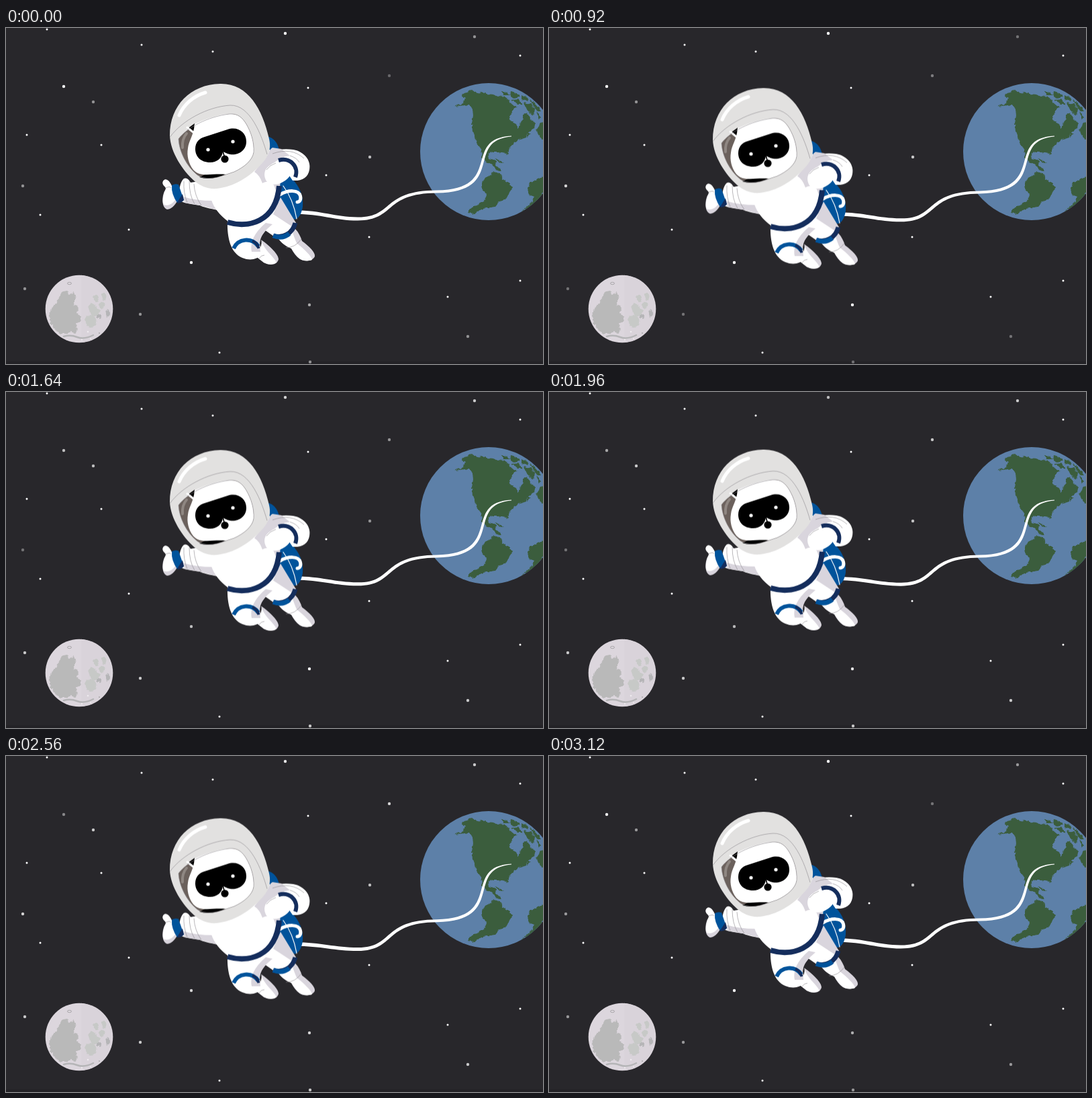
Write an HTML page that moves like this. It is 800 by 500 pixels and loops after 3.16 s.

```html
<!DOCTYPE html>
<html lang="en">
<head>
<meta charset="utf-8">
<title>Tethered astronaut</title>
<style>
html, body { margin: 0; width: 100%; height: 100%; overflow: hidden; background: #28272b; }
svg { display: block; width: 100vw; height: 100vh; }
.white { fill: #fff; }
.lilac { fill: #d9d5dd; }
.blue { fill: #00539b; }
.line { fill: none; stroke-linecap: round; stroke-linejoin: round; }
.thin { fill: none; stroke: #8b898e; stroke-width: .6; }
.navyband { fill: none; stroke: #142d5c; }
.blueband { fill: none; stroke: #00539b; }

#astronaut { animation: bob 3160ms ease-in-out infinite; }
@keyframes bob {
  0%, 100% { transform: translateY(0); }
  21.5% { transform: translateY(7.5px); }
  45.9% { transform: translateY(2px); }
  57.6% { transform: translateY(4.5px); }
  67.1% { transform: translateY(.4px); }
  83.5% { transform: translateY(10px); }
}

#tether { animation: sway 3160ms ease-in-out infinite; }
@keyframes sway {
  0%, 100% { d: path("M430 271.3C470 271.3 490 281.5 524 281.5C578.5 282 558.5 242 642 241.5C743 240 678 164.5 753 160.5L753 161.5C682 167.5 747 244 642 245.5C561.5 246 581.5 286 524 286.5C490 286.5 470 276.7 430 276.7Z"); }
  13.9%, 51.9% { d: path("M430 274.3C470 274.3 490 283.3 524 283.3C578.5 283.8 558.5 243 642 242.4C743 240.4 678 164.5 753 160.5L753 161.5C682 167.5 747 244.4 642 246.4C561.5 247 581.5 287.8 524 288.3C490 288.3 470 279.7 430 279.7Z"); }
  83%  { d: path("M430 277.3C470 277.3 490 285.1 524 285.1C578.5 285.6 558.5 244 642 243.3C743 241 678 164.5 753 160.5L753 161.5C682 167.5 747 245 642 247.3C561.5 248 581.5 289.6 524 290.1C490 290.1 470 282.7 430 282.7Z"); }
}

.twinkle { animation: twinkle 3160ms linear infinite; }
@keyframes twinkle {
  0%, 100% { opacity: var(--a); }
  13.9% { opacity: var(--b); }
  18.4%, 35.8% { opacity: var(--c); }
  51.9% { opacity: var(--d); }
  70.9% { opacity: var(--e); }
  81%, 88.6% { opacity: var(--f); }
}
</style>
</head>
<body>
<svg viewBox="0 0 800 500">
  <defs>
    <clipPath id="globe"><circle cx="719" cy="184" r="102"/></clipPath>
    <filter id="rough" x="-5%" y="-5%" width="110%" height="110%">
      <feTurbulence type="fractalNoise" baseFrequency=".18" numOctaves="2" seed="4"/>
      <feDisplacementMap in="SourceGraphic" scale="5" xChannelSelector="R" yChannelSelector="G"/>
    </filter>
  </defs>
  <rect width="800" height="500" fill="#28272b"/>
  <rect y="496" width="800" height="4" fill="#232226"/>
  <g id="stars" class="white"></g>

  <g id="moon">
    <circle cx="109" cy="418" r="50.3" fill="#dcd6dd"/>
    <path d="M112 367.8A50.3 50.3 0 0 1 112 468Z" fill="#d9d3da"/>
    <g filter="url(#rough)">
      <path d="M79 401L83 393 90 391 93 397 101 393 104 402 101 412 108 416 106 424 112 430 110 437 104 440 106 447 104 455 97 452 88 455 80 455 72 448 66 440 64 428 68 415 74 410Z" fill="#b9b9b9"/>
      <g fill="#c7c9c7">
        <ellipse cx="126" cy="436" rx="8.5" ry="9"/>
        <path d="M123 416L126 409 132 411 135 417 141 420 138 427 130 429 125 425Z"/>
        <ellipse cx="134" cy="402" rx="4" ry="5"/>
        <ellipse cx="143" cy="412" rx="4.5" ry="5.5"/>
        <ellipse cx="146" cy="400" rx="3.5" ry="6"/>
      </g>
      <path d="M148 420L153 419 155 427 150 431Z" fill="#b5b5b7"/>
      <circle cx="138" cy="429" r="3" fill="#b5b5b7"/>
    </g>
    <ellipse cx="94.5" cy="380" rx="3" ry="1.7" fill="none" stroke="#a9a7aa"/>
    <path class="line" d="M86 459Q96 456 106 460T130 457" stroke="#b5b5b7" stroke-width="2.5"/>
    <g fill="#eeeaee"><circle cx="113" cy="464" r="1.2"/><circle cx="122" cy="452" r="1.3"/><circle cx="126" cy="462" r="1"/></g>
    <circle cx="139" cy="454" r="1" fill="#a9a7aa"/>
  </g>

  <g id="earth" clip-path="url(#globe)">
    <rect x="616" y="82" width="184" height="205" fill="#5d80a8"/>
    <g fill="#3b5d3c" filter="url(#rough)">
      <path d="M680 99L686 95 694 93 702 97 708 95 716 98 726 99 733 102 739 100 746 105 751 111 756 115 762 118 755 123 750 131 752 139 760 143 763 150 766 144 769 135 772 127 778 128 782 136 788 142 787 150 776 156 775 163 763 167 757 172 750 179 747 190 743 186 733 184 724 184 719 188 720 194 725 196 730 199 729 204 734 208 738 213 734 213 728 208 722 203 714 199 709 193 708 182 704 174 699 165 695 154 694 142 696 130 695 121 691 114 683 115 668 117 680 112 684 106Z"/>
      <path d="M728 214L738 218 740 225 748 230 755 237 749 246 744 255 734 259 728 266 716 268 707 270 698 277 688 276 692 269 702 262 712 257 716 248 709 239 709 229 717 221Z"/>
      <path d="M803 220L790 226 781 230 777 238 779 248 787 251 785 258 768 273 790 262 803 240Z"/>
      <path d="M729 195L736 197 742 202 735 200Z"/>
      <path d="M776 153L782 158 776 162Z"/>
      <path d="M738 94L747 95 750 100 741 100ZM752 95L761 97 766 103 757 105 751 101ZM754 107L764 106 769 113 762 114ZM768 99L778 105 776 109 768 106ZM771 111L782 113 788 121 785 130 777 123ZM781 106L790 114 797 124 792 124 785 116ZM790 124L798 132 794 137ZM790 151L796 142 803 140 803 168 797 164Z"/>
    </g>
  </g>

  <path id="tether" class="white" d="M430 271.3C470 271.3 490 281.5 524 281.5C578.5 282 558.5 242 642 241.5C743 240 678 164.5 753 160.5L753 161.5C682 167.5 747 244 642 245.5C561.5 246 581.5 286 524 286.5C490 286.5 470 276.7 430 276.7Z"/>

  <g id="astronaut">
    <g id="pack">
      <path class="blue" d="M389 161Q404 165 407 182L425 223Q444 242 442 266Q439 283 430 285L398 265Z"/>
      <path class="line" d="M413 235Q428 255 433 284" stroke="#fff" stroke-width="1.2"/>
      <path class="line" d="M408 248C420 241 436 240 438.500 250C440 256 437 259 434 259" stroke="#fff" stroke-width="5"/>
    </g>

    <g id="far-leg">
      <path class="lilac" d="M404 311L431 299C436 304 439 311 441 317C452 325 461 334 460 340C457 347 445 348 438 344C432 340 428 334 425 328C415 324 408 318 404 311Z"/>
      <path class="white" d="M405 311L427 304C429 311 431 315 433 320C444 329 455 339 456 345C448 348 440 346 436 342C431 337 428 333 425 328C415 324 409 318 405 311Z"/>
      <path class="thin" d="M417 327Q431 327 440 314"/>
      <path class="white" d="M376 294L404 262 432 290 430 300Q418 314 399 310Z"/>
      <path class="lilac" d="M398 277L409 252 432 290 427 296Z"/>
      <path class="navyband" d="M398 309C412 314 427 306 431 290" stroke-width="7"/>
      <path class="blueband" d="M398 309C408 313 416 311 422 306" stroke-width="7"/>
    </g>

    <g id="near-leg">
      <path class="lilac" d="M370 338C378 331 383 321 380 315C394 325 406 337 406 344C404 353 393 354 384 349Z"/>
      <path class="white" d="M370 338C378 331 383 322 380 316C385 331 398 339 403 349C397 353 390 352 384 349Z"/>
      <path class="white" d="M330 287C329 313 335 335 352 342C364 347 375 344 380 337L378 320C378 308 388 300 398 291L380 282Z"/>
      <path class="lilac" d="M366 333C363 316 373 302 387 290L397 292C386 301 378 310 378 322L379 333Z"/>
      <path class="blueband" d="M339 328C346 313 366 311 376 325" stroke-width="6"/>
      <path class="navyband" d="M367 317Q374 319 376.500 328" stroke-width="4"/>
      <path class="thin" d="M377 343Q380 338 385 338"/>
    </g>

    <g id="near-arm">
      <path class="white" d="M258 257C257 242 259 229 265 224C269 222 273 226 275 230L300 226 316 271C304 269 292 266 289 264Q274 262 266 260Z"/>
      <path class="lilac" d="M264 251Q282 257 309 257L316 271 289 264 266 260Z"/>
      <path class="thin" d="M265 228Q264 245 270 260M273 228Q273 249 281 262M280 232Q281 250 291 264"/>
      <path class="lilac" d="M236 243C231 255 233 268 240 270C248 270 254 260 257 254L249 234Z"/>
      <path class="white" d="M247 235C243 225 236 222 233.500 229C232 234 238 236 238 239C233 249 233 260 235 263C243 266 251 260 254 252Z"/>
      <path class="thin" d="M238 238Q244 235 246 238"/>
      <path class="blue" d="M247 234Q252 231 257 233L265 256Q260 261 255 260Q246 247 247 234Z"/>
      <path d="M256 258L263 247 265 256Q261 261 255 260Z" fill="#142d5c"/>
    </g>

    <g id="torso">
      <path class="white" d="M283 230L392 180C403 197 410 220 408 238C406 280 368 300 331 288C318 278 310 268 306 256Z"/>
      <path class="lilac" d="M370 214L393 185C404 200 410 219 408 237L401 240C400 229 390 226 382 231Q378 219 370 214Z"/>
      <path class="navyband" d="M330 289C360 298 402 290 407 235" stroke-width="8"/>
    </g>

    <g id="far-arm">
      <path class="white" d="M388 199C392 183 407 178 428 181C445 184 455 198 452 211C450 223 440 228 427 227L410 202Z"/>
      <path class="lilac" d="M384 207C390 191 391 181 397 178L410 180 423 190Q405 192 394 207Z"/>
      <path class="thin" d="M397 187Q425 177 444 194M423 190Q433 193 437 200"/>
      <path class="white" d="M389 208C397 200 412 193 421 199C430 209 425 221 416 227C405 235 393 234 388 228C384 221 384 213 389 208Z"/>
      <path class="navyband" d="M406 197C423 192 437 206 431 222" stroke-width="6"/>
      <path class="thin" d="M388 211Q393 204 402 201"/>
    </g>

    <g id="helmet">
      <path d="M319 83C360 82 382 120 392 165C396 182 389 194 380 203C362 222 340 236 314 239C300 240 290 235 281 228C263 212 245 185 244 160C244 115 275 84 319 83Z" fill="#e2e1e0"/>
      <path class="thin" d="M244.500 162C262 138 300 117 334 115C364 114 381 160 389 188"/>
      <path d="M257 165C270 148 300 132 333 128C345 127 352 133 358 143C365 155 370 170 369 185C367 197 355 207 340 214L322 220C305 226 290 224 283 217C270 206 258 185 257 165Z" fill="#6b615c"/>
      <path d="M270 150L281 142 279 156Z"/>
      <path class="line" d="M270 148L280 156" stroke="#fff" stroke-width="3"/>
      <path class="line" d="M263 178Q262 165 269 157" stroke="#8f8782" stroke-width="4"/>
      <path d="M288 222L303 215 330 216C315 224 300 226 288 222Z"/>
      <path class="white" d="M281 143C300 134 320 128 333 128C345 127 352 133 358 143C365 155 370 170 369 185C367 197 355 207 340 214L328 218C306 216 290 223 279 211C272 202 269 190 271 179C272 168 280 159 281 143Z"/>
      <path class="thin" d="M257 165C270 148 300 132 333 128C345 127 352 133 358 143C365 155 370 170 369 185C367 197 355 207 340 214L322 220C305 226 290 224 283 217C270 206 258 185 257 165Z"/>
      <path d="M296 162L330 151C345 146 358 155 358 169C358 183 345 190 334 188C328 187 325 184 323 184C322 193 315 200 304 200C290 200 282 191 282 180C282 170 288 164 296 162Z"/>
      <circle class="white" cx="301" cy="181" r="2.6"/>
      <circle class="white" cx="338" cy="169" r="2.6"/>
      <path class="line" d="M323 183L326 194" stroke="#000" stroke-width="1.600"/>
      <circle cx="326" cy="195" r="5.6"/>
      <path class="line" d="M258 130C265 113 280 101 297 96" stroke="#fff" stroke-width="5"/>
    </g>
  </g>
</svg>
<script>
const steady = [
  [61, 2], [202, 25], [308, 35], [766, 41], [450, 89], [31, 159], [142, 174], [477, 219],
  [51, 278], [183, 300], [541, 311], [766, 376], [658, 400], [318, 483]
];
// Positions sharing one brightness cycle, given in tenths.
const cycles = [
  [[5, 7, 3.5, 7.5, 7.5, 7.5], [28, 388], [200, 426], [453, 497], [698, 13], [688, 459]],
  [[10, 7, 10, 8, 6, 9], [416, 8]],
  [[10, 8, 10, 7, 5, 4.5], [86, 87]],
  [[5, 3.5, 5, 7, 8, 7.5], [130, 110]],
  [[5, 5.5, 8, 3.5, 3.5, 8], [25, 235]],
  [[10, 7, 10, 7, 6.5, 8], [276, 349]],
  [[6, 9, 10, 10, 8, 8], [452, 412]],
  [[7, 5, 7.5, 5, 9, 7], [542, 192]],
  [[3, 8, 4, 5, 9.5, 8], [571, 71]]
];
const stars = document.getElementById('stars');

function addStar([x, y], r) {
  const star = document.createElementNS(stars.namespaceURI, 'circle');
  star.setAttribute('cx', x);
  star.setAttribute('cy', y);
  star.setAttribute('r', r);
  return stars.appendChild(star);
}

steady.forEach(p => addStar(p, 1.5));
for (const [levels, ...places] of cycles) {
  for (const p of places) {
    const star = addStar(p, 2.2);
    star.setAttribute('class', 'twinkle');
    levels.forEach((v, i) => star.style.setProperty('--' + 'abcdef'[i], v / 10));
  }
}
</script>
</body>
</html>
```
